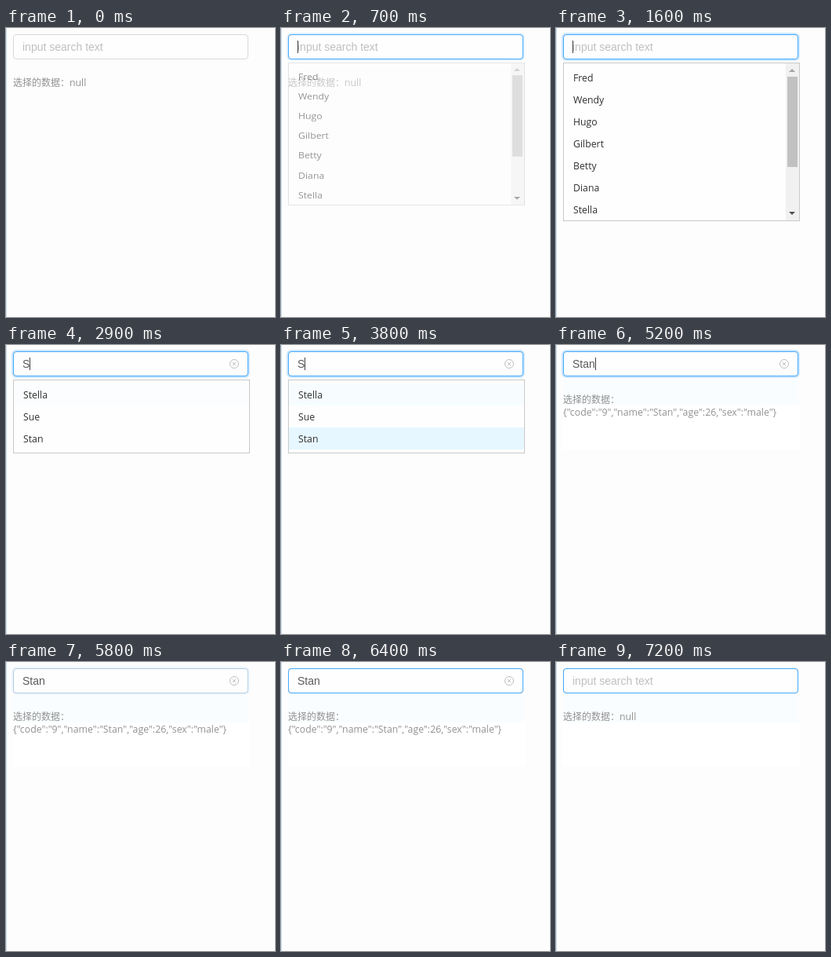
Animation, 343 px wide and 368 px high, one loop 8 s. Source, as an HTML page:

```html
<!DOCTYPE html>
<html lang="zh-CN">
<head>
<meta charset="utf-8">
<title>Search with suggestions</title>
<style>
  html, body { margin: 0; width: 100%; height: 100%; overflow: hidden; background: #fdfdfd; }
  svg { display: block; width: 343px; height: 368px; }
  text { white-space: pre; }
  .field { font: 14px "Liberation Sans", Arial, sans-serif; fill: #595959; }
  .hint { fill: #bfbfbf; }
  .option { font: 12.3px "Open Sans", sans-serif; fill: #303030; }
  .info { font: 12.3px "Open Sans", sans-serif; fill: #929292; }
  .label { font: 12px "Noto Sans CJK SC", "Noto Sans CJK", sans-serif; fill: #929292; }
</style>
</head>
<body>
<svg id="stage" viewBox="0 0 343 368"></svg>
<script>
const LOOP = 8000, STEP = 100;
const people = ["Fred", "Wendy", "Hugo", "Gilbert", "Betty", "Diana", "Stella"];
const matches = ["Stella", "Sue", "Stan"];
const picked = '{"code":"9","name":"Stan","age":26,"sex":"male"}';
const caretTimes = [[700, 1100], [1600, 2400], [2900, 3400], [3800, 4700], [5200, 5700]];
const stage = document.getElementById("stage");

const within = (t, from, to) => t >= from && t < to;

// Eased transition that reaches 1 on its last step.
function ramp(t, start, steps) {
  const p = Math.max(0, Math.min(1, (t - start + STEP) / (steps * STEP)));
  return p * p * (3 - 2 * p);
}

const rect = (x, y, w, h, fill, extra = "") =>
  `<rect x="${x}" y="${y}" width="${w}" height="${h}" fill="${fill}" ${extra}/>`;
const text = (x, y, kind, value) => `<text x="${x}" y="${y}" class="${kind}">${value}</text>`;

function inputBox(t) {
  const blue = ramp(t, 300, 2) - ramp(t, 5700, 3) + ramp(t, 6200, 3)
    - ramp(t, 6500, 2) + ramp(t, 7000, 3);
  const glow = ramp(t, 700, 2) - ramp(t, 5700, 3);
  const value = within(t, 1900, 4200) ? "S" : within(t, 4200, 7000) ? "Stan" : "";
  const border = (color, opacity) =>
    rect(9.5, 8.5, 299, 31, "none", `rx="3.5" stroke="${color}" stroke-opacity="${opacity}"`);

  let out = rect(8, 7, 302, 34, "none", `rx="5" stroke="#1890ff" stroke-width="2" stroke-opacity="${0.2 * glow}"`)
    + rect(9.5, 8.5, 299, 31, "#fefefe", 'rx="3.5"')
    + border("#d9d9d9", 1) + border("#40a9ff", blue)
    + (value ? text(21, 29, "field", value) : text(21, 29, "field hint", "input search text"));
  if (value) {
    out += `<g fill="none" stroke="#bfbfbf"><circle cx="291" cy="24" r="5.5"/>
      <path d="M289 22l4 4m0-4l-4 4"/></g>`;
  }
  if (caretTimes.some(([from, to]) => within(t, from, to))) {
    out += rect({ "": 21, S: 30, Stan: 50 }[value], 16, 1, 16, "#404040");
  }
  return out;
}

function info(t) {
  const chosen = within(t, 4200, 7000);
  const backdrop = t >= 4200
    ? rect(9, 43, 300, 34, "#f9fdff") + rect(9, 77, 302, 56, "#fff") : "";
  return backdrop + text(9, 74, "label", "选择的数据：")
    + (chosen ? text(9, 90, "info", picked) : text(81, 74, "info", "null"));
}

const options = names => names.map((name, i) => text(22, 68 + 28 * i, "option", name)).join("");
const panel = height =>
  rect(9.5, 44.5, 301, height - 1, "#fefefe", 'stroke="#c9c9c9"');

const scrollbar = rect(293, 45, 17, 200, "#f1f1f1") + rect(295, 62, 13, 115, "#c1c1c1")
  + '<path d="M297 56h8l-4-4z" fill="#a3a3a3"/><path d="M297 234h8l-4 4z" fill="#505050"/>';

function dropdown(t) {
  if (within(t, 700, 1900)) {
    const shown = ramp(t, 700, 2);
    return `<g opacity="${shown}" transform="translate(0 44) scale(1 ${0.8 + 0.2 * shown}) translate(0 -44)">
      ${panel(202)}${options(people)}${scrollbar}</g>`;
  }
  if (!within(t, 1900, 4200)) return "";
  const row = (i, opacity) =>
    rect(10, 49 + 28 * i, 300, 28, "#e6f7ff", `fill-opacity="${opacity}"`);
  const moved = ramp(t, 3400, 2);
  const first = 0.12 + 0.88 * ramp(t, 3100, 2) - 0.68 * moved;
  return panel(94) + row(0, first) + row(2, moved) + options(matches);
}

let lastStep = -1;
function frame(now) {
  const t = Math.floor(now % LOOP / STEP) * STEP;
  if (t !== lastStep) {
    lastStep = t;
    stage.innerHTML = rect(0, 0, 343, 368, "#fdfdfd") + rect(0, 0, 1, 368, "#c3ddf5")
      + info(t) + inputBox(t) + dropdown(t);
  }
  requestAnimationFrame(frame);
}
frame(0);
</script>
</body>
</html>
```
